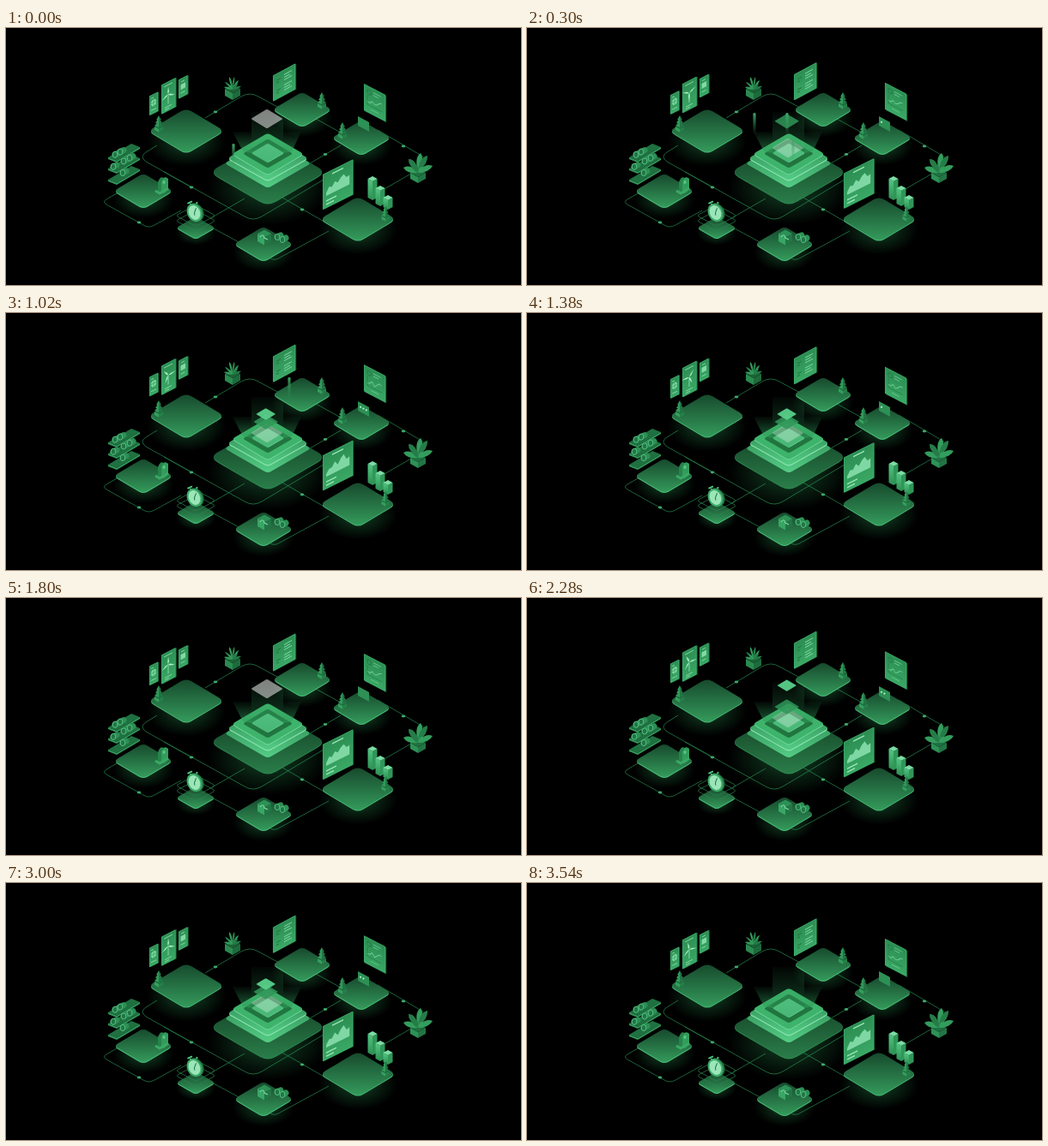
Write an HTML page that moves like this. It is 600 px wide and 300 px high and loops after 3600 ms.

```html
<!DOCTYPE html>
<html lang="en">
<head>
<meta charset="utf-8">
<title>Isometric network</title>
<style>
html,body{margin:0;width:100%;height:100%;overflow:hidden;background:#000}
svg{display:block;width:600px;height:300px}
</style>
</head>
<body>
<svg id="stage" viewBox="0 0 600 300" xmlns="http://www.w3.org/2000/svg">
<defs>
<linearGradient id="plate" x1="0" y1="0" x2="0" y2="1"><stop offset="0" stop-color="#174a2d"/><stop offset="1" stop-color="#349a5b"/></linearGradient>
<linearGradient id="base" x1="0" y1="0" x2="0" y2="1"><stop offset="0" stop-color="#123c24"/><stop offset="1" stop-color="#2a7d49"/></linearGradient>
<linearGradient id="panel" x1="0" y1="0" x2="0" y2="1"><stop offset="0" stop-color="#2c8d52"/><stop offset="1" stop-color="#3aa865"/></linearGradient>
<linearGradient id="side" x1="0" y1="0" x2="0" y2="1"><stop offset="0" stop-color="#258049"/><stop offset="1" stop-color="#55cd86"/></linearGradient>
<linearGradient id="bar" x1="0" y1="0" x2="0" y2="1"><stop offset="0" stop-color="#52c883"/><stop offset="1" stop-color="#2c8d51"/></linearGradient>
<linearGradient id="beam" x1="0" y1="0" x2="0" y2="1"><stop offset="0" stop-color="#2f9c5a" stop-opacity=".05"/><stop offset="1" stop-color="#2f9c5a" stop-opacity=".6"/></linearGradient>
<linearGradient id="ray" x1="0" y1="0" x2="0" y2="1"><stop offset="0" stop-color="#3cab69"/><stop offset="1" stop-color="#2a8a50" stop-opacity="0"/></linearGradient>
<radialGradient id="glow"><stop offset="0" stop-color="#2fae60" stop-opacity=".4"/><stop offset=".55" stop-color="#2fae60" stop-opacity=".17"/><stop offset="1" stop-color="#2fae60" stop-opacity="0"/></radialGradient>
</defs>
<g id="scene"></g>
</svg>
<script>
const PERIOD = 1800, LOOP = 3600;
const PALE = '#83d9a6', LIGHT = '#50c480', MID = '#2f9658', DARK = '#195c34';
const poly = (pts, fill, extra = '') => `<polygon points="${pts}" fill="${fill}" ${extra}/>`;
const line = (d, stroke = '#237a48', w = .8, extra = '') =>
  `<path d="${d}" fill="none" stroke="${stroke}" stroke-width="${w}" ${extra}/>`;
const oval = (x, y, rx, ry, fill, extra = '') =>
  `<ellipse cx="${x}" cy="${y}" rx="${rx}" ry="${ry}" fill="${fill}" ${extra}/>`;
const group = (id, body, transform = '') => `<g id="${id}" transform="${transform}">${body}</g>`;

// Diamond with softened corners; w and h are the visible half sizes, k the cut share of each side
function gem(x, y, w, h, k = .14) {
  const s = 1 / (1 - k / 2);
  const p = [[0, -h * s], [w * s, 0], [0, h * s], [-w * s, 0]];
  const mix = (a, b) => [x + a[0] + (b[0] - a[0]) * k, y + a[1] + (b[1] - a[1]) * k];
  return p.map((c, i) => {
    const a = mix(c, p[(i + 3) % 4]), b = mix(c, p[(i + 1) % 4]);
    return `${i ? 'L' : 'M'}${a}Q${x + c[0]},${y + c[1]} ${b}`;
  }).join('') + 'Z';
}
const diamond = (x, y, w, h, fill, extra = '', k) => `<path d="${gem(x, y, w, h, k)}" fill="${fill}" ${extra}/>`;

function plate(x, y, w, h, fill = 'url(#plate)', edge = '#45ba75') {
  return oval(x, y + h * .5, w * 1.12, h * 1.2, 'url(#glow)') +
    diamond(x, y + 1.1, w, h, edge) + diamond(x, y, w, h, fill);
}

function box(x, y, w, h, top = LIGHT, left = MID, right = DARK) {
  const q = w * .55;
  return poly([x - w, y, x, y + q, x, y + q + h, x - w, y + h], left) +
    poly([x + w, y, x, y + q, x, y + q + h, x + w, y + h], right) +
    poly([x - w, y, x, y - q, x + w, y, x, y + q], top);
}

function tree(x, y, s = 1) {
  let out = box(0, 4, 5, 4, '#1f7040', '#349f5e', '#258049');
  for (const [top, w] of [[-2, 5], [-5.5, 4], [-9, 2.8]])
    out += poly([0, top, -w, top + 5, 0, top + 7], '#319a5a') +
      poly([0, top, w, top + 5, 0, top + 7], '#237545');
  return group('', out, `translate(${x} ${y}) scale(${s})`);
}

function leaves(x, y, tips, w) {
  return tips.map(([dx, dy], i) => {
    const n = Math.hypot(dx, dy), px = -dy / n * w, py = dx / n * w;
    return `<path d="M${x},${y}Q${x + dx * .6 + px},${y + dy * .75 + py} ${x + dx},${y + dy}Q${x + dx * .6 - px},${y + dy * .75 - py} ${x},${y}" fill="${i % 2 ? '#267c48' : '#339d5d'}"/>`;
  }).join('');
}

// Links and their nodes
function links() {
  const d = [
    'M232,105L274,80Q284,74 294,80L318,93',
    'M176,137L163,145Q155,150 163,156L278,220Q288,226 298,220L400,159',
    'M361,106L388,121', 'M354,158L390,137',
    'M433,119L484,149Q494,155 484,163L439,189',
    'M131,192L117,200Q112,203 117,206L160,230Q166,234 173,230L204,213',
    'M184,168L216,186', 'M240,221L278,199', 'M240,233L275,252',
    'M322,198L374,228', 'M308,269Q313,272 319,268L376,237'
  ];
  const dots = [[244, 98], [216, 186], [155, 227], [345, 212], [372, 147.5], [463, 138]];
  return d.map(v => line(v)).join('') + dots.map(([x, y]) => oval(x, y, 2.3, 1.4, '#3fa869')).join('');
}

function shelves() {
  let out = '';
  [[119, 150, [8, 14]], [119, 163, [6, 18, 25]], [119, 176, [17]]].forEach(([x, y, spots]) => {
    out += poly([x, y + 1, x + 27, y - 15, x + 37, y - 11, x + 10, y + 5], '#1f7040') +
      poly([x, y + 1, x + 10, y + 5, x + 37, y - 11, x + 37, y - 9, x + 10, y + 7, x, y + 3], '#339d5d');
    for (const s of spots) {
      const cx = x + s, cy = y - s * .53 + 2;
      out += line(`M${cx},${cy}l4,-2`, '#2c8f54', 7, 'stroke-linecap="round"') +
        oval(cx, cy, 2.8, 3.6, '#227645', 'stroke="#5ac688" stroke-width=".9"');
    }
  });
  return out;
}

function clock() {
  let out = plate(221, 233, 21, 12);
  for (const y of [219, 225]) out += diamond(221, y, 21.5, 11.5, 'none', 'stroke="#2b874f" stroke-width=".7"');
  return out + group('', line('M0,-9V-13M-3,-13H3M6,-8L8,-10', LIGHT, 2) +
    oval(2, .6, 8.5, 11, '#237545') + oval(0, 0, 8.5, 11, '#3dab68') + oval(0, 0, 6.5, 8.8, '#9be6b8') +
    line('M-1,3L0,0L4,-4', '#207546', 1), 'translate(219.5 215.5) rotate(-24)');
}

function props() {
  let out = shelves();
  for (const x of [179, 183]) out += `<path d="M${x - 2},193V180Q${x + 1},171 ${x + 6},176V189L${x + 1},193Z" fill="${x < 180 ? '#26844b' : '#329c5b'}"/>`;
  out += oval(184, 180, 1.5, 2, '#5ac688') + line('M174,190L179,193L189,187', '#3aa865', 3);
  // Plants
  out += box(264, 71, 9, 8, '#1c6338', '#2a8a50', '#1d6b3c') +
    leaves(264, 72, [[-10, -3], [-9, -9], [-4, -15], [2, -15], [7, -11], [10, -4], [-5, -6], [6, -7]], 2.4);
  out += box(480, 169, 9, 7, '#1f7040', '#2d9156', '#237545') +
    leaves(480, 169, [[-17, -6], [-11, -16], [3, -23], [11, -20], [17, -8], [-6, -10], [8, -6]], 6.5);
  out += tree(178, 111) + tree(368, 84) + tree(392, 119);
  for (const [x, y, h] of [[427, 176, 22], [436, 187, 18], [445, 198, 11]])
    out += box(x, y, 5.5, h, '#7adca3', 'url(#bar)', '#2f9658');
  out += tree(442, 216, .9);
  // Items on the lower plate
  out += box(301, 240, 8, 9, '#2d9156', '#38a664', '#237545') + line('M296,244Q299,239 301,245L305,247', PALE, 1.2);
  for (const [x, y] of [[316, 244], [322, 247]])
    out += line(`M${x},${y}l4,-2`, '#2c8f54', 7, 'stroke-linecap="round"') +
      oval(x, y, 2.8, 3.6, '#227645', 'stroke="#5ac688" stroke-width=".9"');
  return out;
}

function tower() {
  return plate(305, 168, 63, 36.5, 'url(#base)', '#2b8a50') +
    diamond(305, 158, 48.5, 28, 'url(#side)', '', .08) +
    diamond(305, 153, 45, 25.5, '#8be5b0', '', .08) +
    diamond(305, 151.8, 45, 25.5, 'url(#side)', '', .08) +
    diamond(305, 148, 40, 23.5, '#72d99d', '', .08) +
    diamond(305, 147, 40, 23.5, '#3eb36c', '', .08) +
    diamond(305, 146.5, 28, 16.5, '#21753f', '', .08) +
    diamond(305, 146, 18.5, 11, '#5fce8e', '', .08);
}

function beams() {
  return poly([264, 121, 286, 121, 286, 146, 276, 144], 'url(#beam)') +
    poly([344, 121, 323, 121, 323, 146, 333, 144], 'url(#beam)') +
    poly([286, 98, 323, 98, 323, 146, 304, 157, 286, 146], 'url(#beam)', 'opacity=".8"');
}

// Upright sheet in skewed local coordinates
function sheet(x, y, w, h, slope, body) {
  return group('', `<rect x="1.2" y=".6" width="${w}" height="${h}" fill="#1c6338"/>` +
    `<rect width="${w}" height="${h}" fill="url(#panel)"/>` +
    `<rect x=".4" y=".4" width="${w - .8}" height="${h - .8}" fill="none" stroke="#45b272" stroke-width=".5"/>` + body,
    `matrix(1 ${slope} 0 1 ${x} ${y})`);
}
const rows = (list, w = 1, color = PALE) => list.map(([x, y, n]) => line(`M${x},${y}h${n}`, color, w)).join('');

function panels() {
  const left = sheet(167, 79.5, 10, 22.5, -.5, oval(5, 10, 3, 4, '#82dba7') + line('M2,10H8M5,6V14', MID, .6) + rows([[2, 4, 3], [2, 18, 6]])) +
    sheet(181, 66.5, 16.5, 34, -.52, rows([[3, 4, 10], [4, 29, 8], [4, 31.5, 5]]) + line('M8,15V26', PALE, 1) +
      group('rotor', [0, 120, 240].map(a => `<path d="M0,0L1,-3L0,-9L-.8,-3Z" fill="#a8efc5" transform="rotate(${a})"/>`).join(''))) +
    sheet(201, 60.5, 10.5, 22, -.52, `<rect x="2.5" y="7" width="5.5" height="6" fill="${PALE}"/>` + rows([[3, 4, 4], [2.5, 17, 5]]));
  const list = sheet(311, 55.5, 26, 30, -.54, [6, 18].map(y =>
    rows([[13, y, 9], [13, y + 3, 7], [13, y + 6, 9]], 1) + rows([[4, y + 2, 5], [4, y + 5, 3]], 1, '#1f7040')).join(''));
  const trend = sheet(417, 65, 25, 31, .52, oval(6, 7, 2.4, 2.6, 'none', 'stroke="#237a48" stroke-width="1"') +
    rows([[11, 5, 9], [11, 8, 6], [8, 26, 9]], .9, '#6acb93') + line('M4,11V22H21', '#237a48', .8) + line('', '#6acb93', .9, 'id="curve"'));
  const chart = sheet(369, 171, 35, 41, -.5, rows([[11, 4.5, 13], [4, 33, 12], [4, 37, 9]], 1.4, '#9be6b8') +
    `<path id="area" fill="#7fd8a3"/>`);
  return { back: left + list + trend, front: chart };
}

const floats = panels();
// x, start, life, foot of each rising ray
const rays = [[265, 0, 400, 135], [303, 0, 620, 135], [310, 250, 620, 135], [285, 460, 500, 135], [330, 520, 620, 135]];
const tiles = [
  { from: 106, to: 140, w: 18, h: 11, fill: '#fff', alpha: .5, rest: .3, start: 40, end: 260 },
  { from: 98, to: 127, w: 14, h: 8.4, fill: '#309759', alpha: .85, rest: .85, start: 210, end: 430 },
  { from: 95, to: 118, w: 11, h: 6.6, fill: '#58cf8a', alpha: .95, rest: .95, start: 400, end: 620 }
];

document.getElementById('scene').innerHTML = links() +
  plate(210, 120, 41, 24.5) + plate(345, 95, 32, 19) + plate(414, 128, 32, 19) +
  plate(160, 190, 32, 19) + plate(410, 223, 41, 24.5) + plate(300, 252, 32, 19) +
  group('back', floats.back) + tower() + clock() + props() +
  poly([410, 103, 423, 110, 423, 121, 410, 114], '#2d9055') +
  [413, 416.4, 419.8].map((x, i) => `<circle class="dot" cx="${x}" cy="${109.8 + i * 1.8}" r="1.1" fill="#b5f2cd"/>`).join('') +
  beams() + tiles.map((p, i) => diamond(i ? 302.7 : 304, 0, p.w, p.h, p.fill, 'class="tile"', .06)).join('') +
  rays.map(([x]) => `<rect class="ray" x="${x - 1.6}" width="3.2" height="26" rx="1.5" fill="url(#ray)"/>`).join('') +
  group('front', floats.front);

const el = id => document.getElementById(id);
const dots = document.querySelectorAll('.dot');
const tileEls = document.querySelectorAll('.tile');
const rayEls = document.querySelectorAll('.ray');
const clamp = v => Math.max(0, Math.min(1, v));
const ease = v => v * v * (3 - 2 * v);

function draw(now) {
  const loop = now % LOOP, t = loop % PERIOD;
  const lift = (1 - Math.cos(t / PERIOD * 2 * Math.PI)) / 2;
  for (const id of ['back', 'front']) el(id).setAttribute('transform', `translate(0 ${-5 * lift})`);
  el('rotor').setAttribute('transform', `translate(8 15) rotate(${t / PERIOD * 360})`);

  const wave = [18, 19, 16, 18, 17, 14, 13].map((y, i) =>
    `${4 + i * 2.8},${y + lift * 1.5 * Math.cos(i * 2.1)}`);
  el('curve').setAttribute('d', 'M' + wave.join('L'));
  const hills = [24, 18, 20, 15, 18, 14, 12, 17, 16].map((y, i) =>
    `${4 + i * 3.4},${y + lift * 1.5 * Math.sin(i * 1.9)}`);
  el('area').setAttribute('d', `M4,27L${hills.join('L')}L31.2,27Z`);

  dots.forEach((d, i) => d.setAttribute('opacity', t > 200 + i * 200 && t < 1500 - i * 200 ? 1 : 0));

  tiles.forEach((p, i) => {
    const drop = ease(clamp((t - p.start) / (p.end - p.start)));
    const shown = i ? clamp((t - p.start) / 60) : 1;
    const gone = clamp((t - 1420) / 230);
    tileEls[i].setAttribute('transform', `translate(0 ${p.from + (p.to - p.from) * drop})`);
    tileEls[i].setAttribute('opacity', (p.alpha + (p.rest - p.alpha) * drop) * shown * (1 - gone));
  });

  rays.forEach(([, start, life, foot], i) => {
    const age = loop - start, u = age / life;
    const a = u < 0 || u > 1 ? 0 : clamp(age / (i ? 70 : 20) + (i ? 0 : 1)) * clamp((1 - u) * 8);
    rayEls[i].setAttribute('y', foot - age * .12);
    rayEls[i].setAttribute('opacity', a);
  });
}

const begin = performance.now();
function tick() {
  draw(performance.now() - begin);
  requestAnimationFrame(tick);
}
tick();
</script>
</body>
</html>
```
